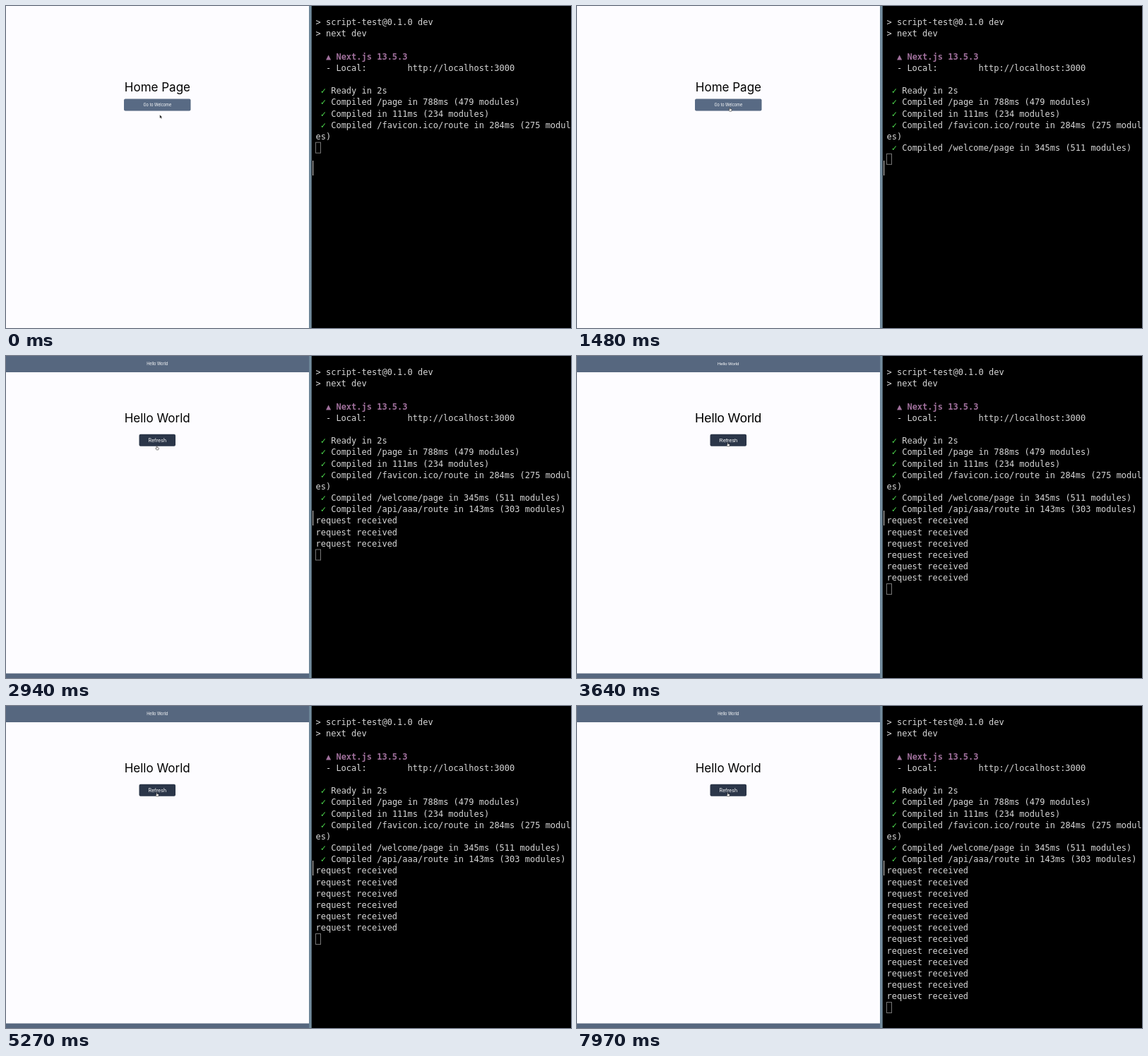
An HTML page for the animation above (8 s loop, 800 by 456 pixels).

```html
<!DOCTYPE html>
<html lang="en">
<head>
<meta charset="utf-8">
<title>Page refresh and server log</title>
<style>
  html, body { margin: 0; width: 100%; height: 100%; overflow: hidden; background: #000; }
  svg { display: block; width: 800px; height: 456px; }
  .page { font-family: Inter, sans-serif; text-anchor: middle; }
  .title { font-size: 17px; fill: #000; }
  .label { font-size: 7px; fill: #fff; }
  .tiny { font-size: 5.5px; fill: #fff; }
  /* Size-adjusted fallback face, seen briefly while the web font loads. */
  .fallback { font-family: "Liberation Sans", Arial, sans-serif; }
  .fallback .title { font-size: 18.3px; }
  .fallback .label { font-size: 7.4px; }
  .fallback .tiny { font-size: 5.9px; }
  .log { font: 12px "DejaVu Sans Mono", monospace; fill: #d6d6d6; }
  .log text { white-space: pre; }
  .ok { fill: #50e350; font-weight: bold; }
  .brand { fill: #a0709c; font-weight: bold; }
</style>
</head>
<body>
<svg viewBox="0 0 800 456">
  <defs>
    <linearGradient id="edge">
      <stop offset="0" stop-color="#667f93"/>
      <stop offset=".6" stop-color="#7891a2"/>
      <stop offset="1" stop-color="#3c4c58"/>
    </linearGradient>
  </defs>
  <rect width="429" height="456" fill="#fdfcff"/>
  <g id="home" class="page">
    <text class="title" x="214.4" y="121">Home Page</text>
    <rect x="167" y="131.5" width="94.5" height="17" rx="2" fill="#586a84"/>
    <text class="tiny" x="214.3" y="142">Go to Welcome</text>
  </g>
  <g id="welcome" class="page">
    <rect width="429" height="23" fill="#56677f"/>
    <rect y="449.5" width="429" height="7" fill="#56677f"/>
    <text class="tiny" x="214.2" y="13">Hello World</text>
    <text class="title" x="214.2" y="93.7">Hello World</text>
    <rect x="188.5" y="110.7" width="51.5" height="17" rx="2" fill="#2b3649"/>
    <text class="label" x="214.3" y="121.7">Refresh</text>
  </g>
  <rect x="429" width="4" height="456" fill="url(#edge)"/>
  <g id="log" class="log"></g>
  <rect id="prompt" x="438.5" width="7" height="15" fill="none" stroke="#777"/>
  <rect x="434" y="219" width="1.2" height="21" fill="#b8b8b8"/>
  <g id="pointer">
    <path id="arrow" d="M0 0V5L1.2 4 2 5.8 2.9 5.4 2.2 3.7H3.6Z" fill="#111" stroke="#fff" stroke-width=".4"/>
    <path id="hand" d="M-.8 .5Q-.3 -.3 .2 .5V2.1L2 2.6Q2.7 2.9 2.5 3.8L1.9 5.6H-.7L-2 3.6Q-1.8 2.7 -.8 3.4Z" fill="#fff" stroke="#222" stroke-width=".6"/>
  </g>
</svg>
<script>
const LOOP = 8000, ROW = 16.17;
const COMPILED = 1080, NAVIGATED = 1520, FETCHED = 1700;
const RELOADS = [3610, 5550, 7280];
const FLASHES = RELOADS.slice(0, 2), FLASH_LENGTH = 90;

const $ = id => document.getElementById(id);
const show = (id, on) => $(id).setAttribute("visibility", on ? "visible" : "hidden");
const ok = message => ` <tspan class="ok">✓</tspan> ${message}`;

const lines = [];
const print = (time, ...texts) => texts.forEach(text => lines.push({ time, text }));
const requests = time => print(time, ...Array(3).fill("request received"));

print(0,
  "&gt; script-test@0.1.0 dev",
  "&gt; next dev",
  "",
  '  <tspan class="brand">▲ Next.js 13.5.3</tspan>',
  "  - Local:        http://localhost:3000",
  "",
  ok("Ready in 2s"),
  ok("Compiled /page in 788ms (479 modules)"),
  ok("Compiled in 111ms (234 modules)"),
  ok("Compiled /favicon.ico/route in 284ms (275 modul"),
  "es)");
print(COMPILED, ok("Compiled /welcome/page in 345ms (511 modules)"));
print(FETCHED, ok("Compiled /api/aaa/route in 143ms (303 modules)"));
[FETCHED, ...RELOADS].forEach(requests);

$("log").innerHTML = lines.map(({ text }, i) =>
  `<text x="438.5" y="${27.2 + i * ROW}">${text}</text>`).join("");
const rows = [...$("log").children];

// Pointer stops: time, x, y
const path = [
  [0, 217.7, 154], [30, 217.7, 154], [270, 216.7, 143.5], [1970, 216.7, 143.5],
  [2700, 213.8, 127.3], [2960, 213.8, 127.3], [3250, 213.8, 122.3], [LOOP, 213.8, 122.3]
];

function pointerAt(t) {
  const i = path.findIndex(stop => stop[0] > t);
  const [t0, x0, y0] = path[i - 1], [t1, x1, y1] = path[i];
  const p = (t - t0) / (t1 - t0), e = p * p * (3 - 2 * p);
  return [x0 + (x1 - x0) * e, y0 + (y1 - y0) * e];
}

function draw(t) {
  const onWelcome = t >= NAVIGATED;
  show("home", !onWelcome);
  show("welcome", onWelcome);
  $("welcome").classList.toggle("fallback",
    FLASHES.some(start => t >= start && t < start + FLASH_LENGTH));

  let count = 0;
  rows.forEach((row, i) => {
    const printed = t >= lines[i].time;
    row.setAttribute("visibility", printed ? "visible" : "hidden");
    count += printed;
  });
  $("prompt").setAttribute("y", 15.3 + count * ROW);

  const [x, y] = pointerAt(t);
  const overButton = onWelcome ? y < 128 : y < 149;
  show("arrow", !overButton);
  show("hand", overButton);
  $("pointer").setAttribute("transform", `translate(${x} ${y})`);
}

const start = performance.now();
function tick() {
  draw((performance.now() - start) % LOOP);
  requestAnimationFrame(tick);
}
tick();
</script>
</body>
</html>
```
